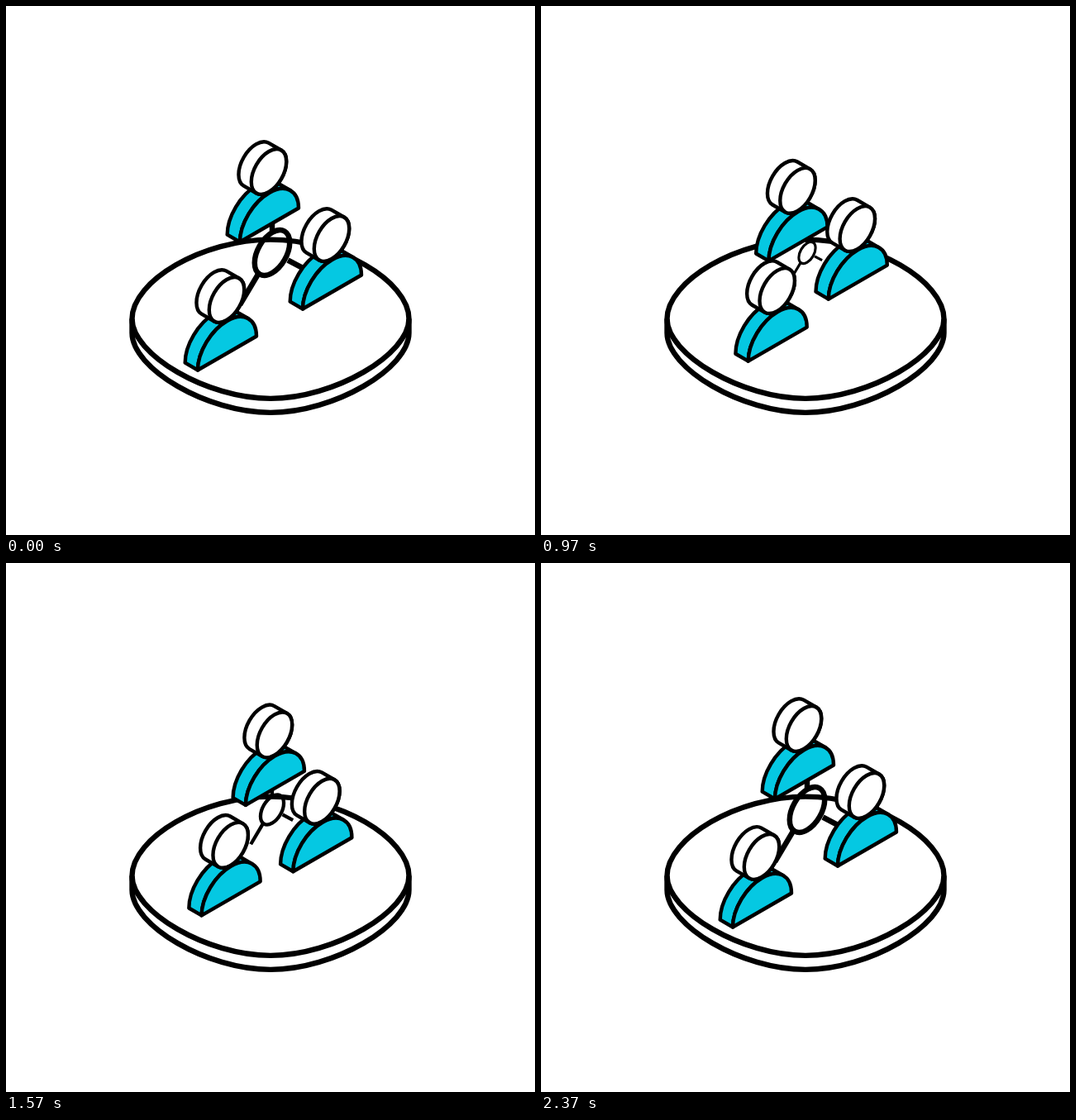
Write an HTML page with a canvas that moves like this. It is 640 by 640 pixels and loops after 2.41 s.

```html
<!DOCTYPE html>
<html lang="en">
<head>
<meta charset="utf-8">
<title>People swapping places</title>
<style>
  html, body { margin: 0; width: 100%; height: 100%; overflow: hidden; background: #fff; }
  canvas { display: block; width: 640px; height: 640px; }
</style>
</head>
<body>
<canvas id="stage" width="640" height="640"></canvas>
<script>
const ctx = document.getElementById('stage').getContext('2d');
const LOOP = 2410, CYAN = '#05c8e2', COS30 = Math.cos(Math.PI / 6);
const DEPTH = -17.7; // extrusion along both local axes
const HEAD = 24.5, BODY_W = 41, BODY_H = 39;
const LINE = 4.4, DISC_LINE = 6.4;
const spots = { back: [283, 285.5], right: [359, 366.5], front: [232, 440.5] };
const moves = [['right', 'back'], ['back', 'front'], ['front', 'right']];

ctx.lineJoin = 'round';

function paint(width, fill) {
  if (fill) {
    ctx.fillStyle = fill;
    ctx.fill();
  }
  ctx.lineWidth = width;
  ctx.stroke();
}

// Builds a path on an upright isometric plane, then paints it with an even stroke.
function isoShape(x, y, scale, build, width, fill) {
  ctx.save();
  ctx.transform(COS30 * scale, -0.5 * scale, 0, scale, x, y);
  ctx.beginPath();
  build();
  ctx.restore();
  paint(width, fill);
}

// Symmetric ease: cubic-bezier(.9, 0, .1, 1)
function ease(x) {
  let lo = 0, hi = 1;
  for (let i = 0; i < 24; i++) {
    const u = (lo + hi) / 2, v = 1 - u;
    if (2.7 * u * v * v + 0.3 * u * u * v + u ** 3 < x) lo = u; else hi = u;
  }
  return lo * lo * (3 - 2 * lo);
}

function platform() {
  const cx = 320, cy = 378.6, w = 167.5, thickness = 17;
  // Half of the rim from one side to the other; a negative w runs right to left.
  const rim = (y, w, h, kx, ky) => {
    const k = Math.sign(w) * kx;
    ctx.bezierCurveTo(cx - w, y + ky, cx - k, y + h, cx, y + h);
    ctx.bezierCurveTo(cx + k, y + h, cx + w, y + ky, cx + w, y);
  };
  ctx.beginPath();
  ctx.moveTo(cx - w, cy);
  ctx.lineTo(cx - w, cy + thickness);
  rim(cy + thickness, w, 96.3, 77, 43);
  ctx.lineTo(cx + w, cy);
  paint(DISC_LINE);
  ctx.beginPath();
  ctx.moveTo(cx - w, cy);
  rim(cy, w, 96.3, 77, 43);
  rim(cy, -w, -96, 82, -46);
  ctx.closePath();
  paint(DISC_LINE);
}

function hub(scale) {
  if (scale < 0.01) return;
  const x = 322, y = 298.5, width = 6.5 * scale;
  isoShape(x, y, scale, () => ctx.arc(0, 0, HEAD, 0, 7), width);
  ctx.beginPath();
  for (const [x1, y1, x2, y2] of [[0, -25, 0, -40], [19, 9, 38, 19], [-17, 26, -39, 63]]) {
    ctx.moveTo(x + x1 * scale, y + y1 * scale);
    ctx.lineTo(x + x2 * scale, y + y2 * scale);
  }
  paint(width);
}

function person(x, y) {
  const edge = -Math.atan2(BODY_H, BODY_W);
  isoShape(x, y, 1, () => {
    ctx.moveTo(0, 0);
    ctx.ellipse(BODY_W + DEPTH, DEPTH, BODY_W, BODY_H, 0, -Math.PI, edge);
    ctx.ellipse(BODY_W, 0, BODY_W, BODY_H, 0, edge, -Math.PI, true);
    ctx.closePath();
  }, LINE, CYAN);
  isoShape(x, y, 1, () => {
    ctx.ellipse(BODY_W, 0, BODY_W, BODY_H, 0, -Math.PI, 0);
    ctx.closePath();
  }, LINE, CYAN);

  const hx = x + 35, hy = y - 85, q = Math.PI / 4;
  isoShape(hx, hy, 1, () => {
    ctx.arc(DEPTH, DEPTH, HEAD, 3 * q, 7 * q);
    ctx.arc(0, 0, HEAD, -q, 3 * q);
    ctx.closePath();
  }, LINE, '#fff');
  isoShape(hx, hy, 1, () => ctx.arc(0, 0, HEAD, 0, 7), LINE, '#fff');
}

function draw(now) {
  const t = now % LOOP / LOOP, p = ease(t);
  ctx.fillStyle = '#fff';
  ctx.fillRect(0, 0, 640, 640);
  platform();
  hub(1 - (1 - Math.abs(2 * t - 1)) ** 3);
  for (const [from, to] of moves) {
    const [x1, y1] = spots[from], [x2, y2] = spots[to];
    person(x1 + (x2 - x1) * p, y1 + (y2 - y1) * p);
  }
}

const start = performance.now();
function tick() {
  draw(performance.now() - start);
  requestAnimationFrame(tick);
}
tick();
</script>
</body>
</html>
```
